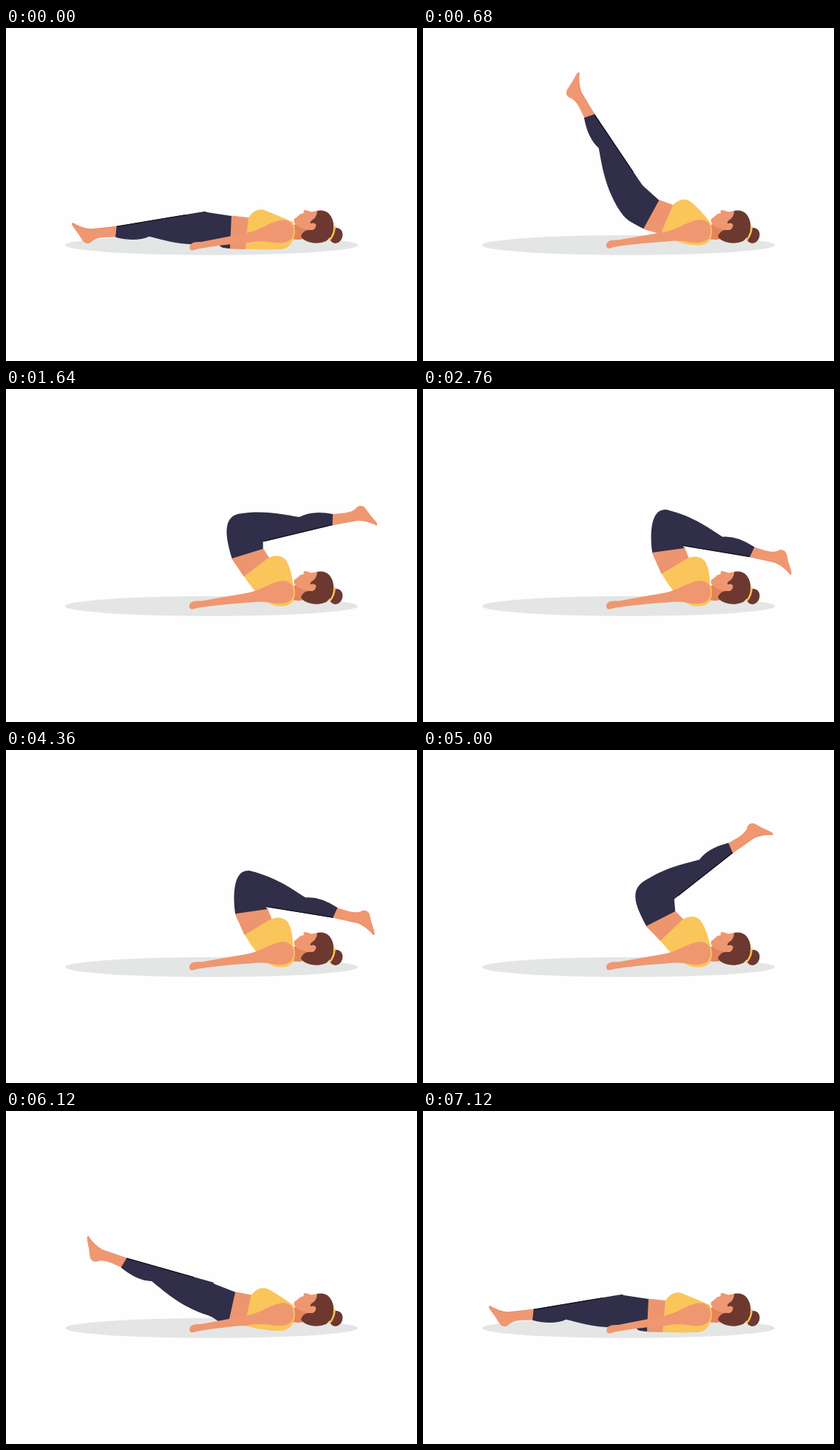
Recreate the animation shown at these times as an HTML page. Size 556 by 450 pixels, loop 7200 ms.

```html
<!DOCTYPE html>
<html lang="en">
<head>
<meta charset="utf-8">
<title>Leg raise</title>
<style>
  html, body { margin: 0; width: 100%; height: 100%; overflow: hidden; background: #fefefe; }
  svg { display: block; width: 556px; height: 450px; }
  .skin { fill: #ef9771; }
  .shade { fill: #e2855e; }
  .top { fill: #fac55a; }
  .hair { fill: #6d382f; }
  .pants { fill: #302e48; }
</style>
</head>
<body>
<svg viewBox="0 0 556 450">
  <ellipse cx="278" cy="293.4" rx="198" ry="13.4" fill="#e4e6e5"/>
  <path class="shade" d="M387 267L400 262L414 272L402 285Q396 287 387 285Z"/>
  <path id="belly" fill="#ed956e" stroke="#ed956e"/>
  <path id="shirt" class="top"/>

  <!-- Drawn from the hip at 0,0 with the foot to the right and the front of the leg below. -->
  <g id="leg">
    <path id="foot" class="shade" d="M128 25L165 27Q177 30 188 39.500Q190 38 188.500 35L184 26L176 15Z"/>
    <path class="skin" d="M128 25L165 26Q177 29 187 38Q189.500 37 188 34L183.500 25Q181 19 178 12Q174 6.500 168 9Q163 14 150 13L128 10Z"/>
    <path class="pants" d="M130 25L134 10.500Q108 -1 89 4C70 -4 45 -17 10 -19.500L-4 0L8 25Z"/>
    <path d="M130 24.500H36" stroke="#15131f" stroke-width="1.300"/>
  </g>
  <path id="pelvis" class="pants"/>

  <path id="arm" class="skin" d="M387 265Q382 258 371 259.500C352 264 350 270 327 275.500Q295 281 264 286.500Q251 285.500 248.500 291Q247 296 250 297.500Q254 298 258 296L271 294Q302 290 330 288.500Q346 286 362 289.500Q378 292 386 285Q392 276 387 265Z"/>
  <path class="skin" d="M424 246.500L413 248.500Q407 246 404 246Q401.500 247 403 250L398 251.500Q396 252.500 396.500 253.500L394 254.500Q394.500 256 391 257Q388.500 259 390 263Q393 268 400 270.500L412 274L424 266Z"/>
  <ellipse class="hair" cx="446.500" cy="280.500" rx="8.800" ry="10.600" transform="rotate(18 446.500 280.500)"/>
  <path class="hair" d="M421 247Q431 245 437 251Q444 259 443 270Q441 282 433 288Q424 292 413 290Q403 288 399 282Q400 277 405 274Q411 272 414 273Q419 271 419.500 266Q418 264 412 264Q411 261 415 259Q421 255 421 247Z"/>
  <path class="skin" d="M411 265Q416 262 419 265Q420 270 415 273L410 273Z"/>
  <path d="M444.500 267.500Q445 278 437.500 287" fill="none" stroke="#fac55a" stroke-width="2.400"/>
</svg>
<script>
const LOOP = 7200, STEP = 40;
const FLAT = 170.5, OVER = 369.5;

// Leg angle in degrees at times in ms.
const swing = [
  [0, FLAT], [40, FLAT], [680, 236], [1640, 346.5], [2160, OVER],
  [4320, OVER], [5000, 321.8], [5640, 245.7], [6600, FLAT], [LOOP, FLAT]
];

const set = (id, name, value) => document.getElementById(id).setAttribute(name, value);
const mix = (a, b, k) => a + (b - a) * k;

// Turns x,y by deg and moves it to the origin point.
function turn([ox, oy], deg, x, y) {
  const r = deg * Math.PI / 180, c = Math.cos(r), s = Math.sin(r);
  return [ox + x * c - y * s, oy + x * s + y * c];
}

// Point on the arc from a to c, pulled towards b.
const arc = (a, b, c, k) => a.map((v, i) => mix(mix(v, b[i], k), mix(b[i], c[i], k), k));

const rate = i => (swing[i + 1][1] - swing[i][1]) / (swing[i + 1][0] - swing[i][0]);

// Speed at a key; zero where the body rests.
function speed(i) {
  if (i === 0 || i === swing.length - 1 || rate(i - 1) * rate(i) <= 0) return 0;
  const before = swing[i][0] - swing[i - 1][0], after = swing[i + 1][0] - swing[i][0];
  return mix(rate(i), rate(i - 1), after / (before + after));
}

function legAngle(t) {
  const i = swing.findIndex((key, n) => t < swing[n + 1][0]);
  const [t0, a0] = swing[i], [t1, a1] = swing[i + 1];
  const span = t1 - t0, k = (t - t0) / span, j = 1 - k;
  return a0 * j * j * (1 + 2 * k) + a1 * k * k * (3 - 2 * k)
       + span * k * j * (speed(i) * j - speed(i + 1) * k);
}

function draw(t) {
  const angle = legAngle(t);
  const fold = (angle - FLAT) / (OVER - FLAT);
  const rest = Math.max(0, 1 - 3 * fold);

  const hip = arc([282, 271], [278, 219], [318, 181], fold);
  const waist = arc([304, 276], [308, 236], [332, 218], fold);
  const hem = arc([326, 277.5], [331, 244.5], [341, 239], fold);
  const waistTilt = mix(2.6, 82, fold), hemTilt = mix(5, 59, fold);

  const leg = (x, y) => turn(hip, angle, x, y);
  const waistFront = turn(waist, waistTilt, 0, -22), waistBack = turn(waist, waistTilt, 0, 22);
  const hemFront = turn(hem, hemTilt, 0, -21), hemBack = turn(hem, hemTilt, 0, 21);
  const bust = (x, y) => turn(hemFront, 40 * fold, x, y);

  set('leg', 'transform', `translate(${hip}) rotate(${angle})`);

  set('pelvis', 'd', `M${waistFront}L${waistBack}
    C${turn(waistBack, waistTilt, -25, 0)} ${leg(-14, -20)} ${leg(10, -19.5)}
    L${leg(45, -5)} ${leg(mix(8, 37, fold), 24)}Z`);

  set('belly', 'd', `M${waistFront}L${hemFront} ${hemBack} ${waistBack}Z`);

  const low = 293.5 + 5.5 * rest;
  set('shirt', 'd', `M${hemFront}Q${bust(8, -13)} ${bust(20, -11)}Q${bust(33, -6)} 388 262
    Q394 275 388 287Q382 ${low + 1} 370 ${low}Q349 ${low + rest} ${hemBack}Z`);

  set('arm', 'transform', `rotate(${-1.2 * rest} 385 275)`);
}

function tick() {
  const t = performance.now() % LOOP;
  draw(Math.floor(t / STEP) * STEP);
  requestAnimationFrame(tick);
}
tick();
</script>
</body>
</html>
```
